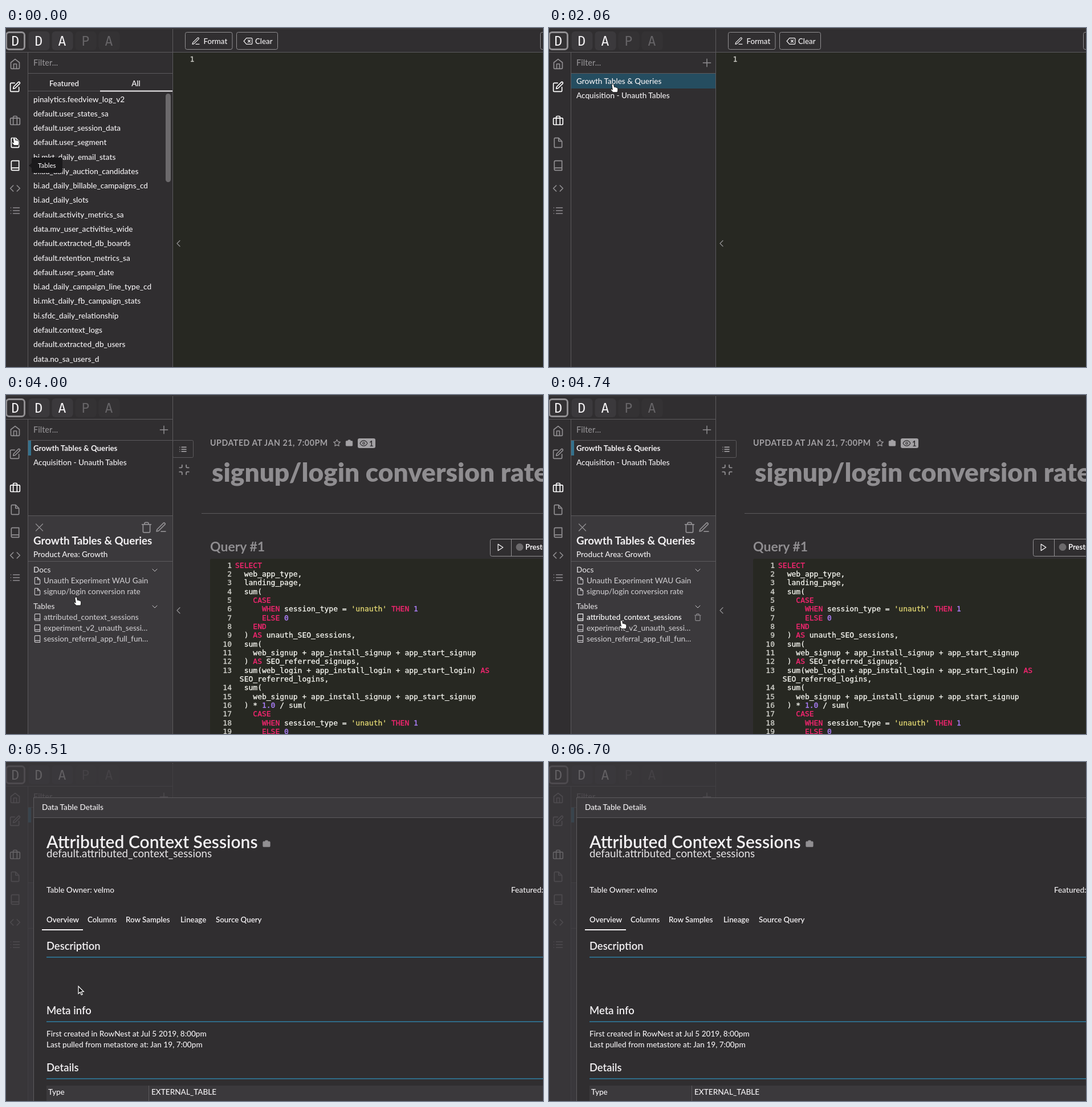
These frames come from a looping animation (942 px wide and 594 px high, 7.12 s). An HTML page:

```html
<!DOCTYPE html>
<html lang="en">
<head>
<meta charset="utf-8">
<title>Table lists</title>
<style>
html, body { margin: 0; width: 100%; height: 100%; overflow: hidden; background: #302e30; }
svg { display: block; width: 942px; height: 594px; }
text { font: 500 13.6px Lato, "Open Sans", sans-serif; white-space: pre; }
.mono { font-family: "DejaVu Sans Mono", "Liberation Mono", monospace; font-weight: 400; }
.code { font-size: 13px; stroke-width: .3px; }
</style>
</head>
<body>
<svg id="stage" viewBox="0 0 942 594"></svg>
<script>
const paths = {
  home: 'M3 9l9-7 9 7v11a2 2 0 0 1-2 2H5a2 2 0 0 1-2-2zM9 22V12h6v10',
  edit: 'M11 4H4a2 2 0 0 0-2 2v14a2 2 0 0 0 2 2h14a2 2 0 0 0 2-2v-7M18.5 2.5a2.1 2.1 0 0 1 3 3L12 15l-4 1 1-4z',
  lists: 'M4 7h16a2 2 0 0 1 2 2v10a2 2 0 0 1-2 2H4a2 2 0 0 1-2-2V9a2 2 0 0 1 2-2zM16 21V5a2 2 0 0 0-2-2h-4a2 2 0 0 0-2 2v16',
  file: 'M13 2H6a2 2 0 0 0-2 2v16a2 2 0 0 0 2 2h12a2 2 0 0 0 2-2V9zM13 2v7h7',
  book: 'M4 19.5A2.5 2.5 0 0 1 6.5 17H20M6.5 2H20v20H6.5A2.5 2.5 0 0 1 4 19.5v-15A2.5 2.5 0 0 1 6.5 2z',
  code: 'M16 18l6-6-6-6M8 6l-6 6 6 6',
  menu: 'M8 6h13M8 12h13M8 18h13M3 6h.01M3 12h.01M3 18h.01',
  trash: 'M3 6h18M19 6v14a2 2 0 0 1-2 2H7a2 2 0 0 1-2-2V6m3 0V4a2 2 0 0 1 2-2h4a2 2 0 0 1 2 2v2',
  pencil: 'M12 20h9M16.5 3.5a2.1 2.1 0 0 1 3 3L7 19l-4 1 1-4z',
  erase: 'M21 4H8l-7 8 7 8h13a2 2 0 0 0 2-2V6a2 2 0 0 0-2-2zM18 9l-6 6M12 9l6 6',
  shrink: 'M8 3v3a2 2 0 0 1-2 2H3m18 0h-3a2 2 0 0 1-2-2V3m0 18v-3a2 2 0 0 1 2-2h3M3 16h3a2 2 0 0 1 2 2v3',
  play: 'M5 3l14 9-14 9z',
  eye: 'M1 12s4-8 11-8 11 8 11 8-4 8-11 8-11-8-11-8zM15 12a3 3 0 1 1-6 0 3 3 0 0 1 6 0z',
  star: 'M12 2l3.1 6.3 6.9 1-5 4.9 1.2 6.8-6.2-3.2L5.8 21 7 14.2 2 9.3l6.9-1z',
  close: 'M3 3l18 18M21 3L3 21',
  plus: 'M12 2v20M2 12h20',
  down: 'M4 8l8 8 8-8',
  left: 'M16 4l-8 8 8 8',
  bag: 'M4 6h4V5a2 2 0 0 1 2-2h4a2 2 0 0 1 2 2v1h4a2 2 0 0 1 2 2v11a2 2 0 0 1-2 2H4a2 2 0 0 1-2-2V8a2 2 0 0 1 2-2z'
};
const BG = '#302e30', PANEL = '#3b393c', LINE = '#5c5a5d', GREY = '#918f92', TEXT = '#f3f1f3', SOFT = '#c9c7ca', BLUE = '#2f6b87';

const rect = (x, y, w, h, fill, more = '') => `<rect x="${x}" y="${y}" width="${w}" height="${h}" fill="${fill}" ${more}/>`;
const box = (x, y, w, h, r = 3, stroke = GREY) => rect(x, y, w, h, 'none', `rx="${r}" stroke="${stroke}"`);
const text = (x, y, str, fill = TEXT, style = '', more = '') =>
  `<text x="${x}" y="${y}" fill="${fill}" style="${style}" ${more}>${str.replace(/&/g, '&amp;')}</text>`;
const codeText = (x, y, str, fill, anchor = 'start') =>
  text(x, y, str, fill, '', `class="mono code" stroke="${fill}" text-anchor="${anchor}"`);
const bold = (size, weight = 700) => `font-size:${size}px;font-weight:${weight}`;
const icon = (name, x, y, size, color = GREY, id = '', width = 2, fill = 'none') =>
  `<path ${id && `id="${id}"`} d="${paths[name]}" transform="translate(${x} ${y}) scale(${size / 24}) translate(-12 -12)" fill="${fill}" stroke="${color}" stroke-width="${width}" stroke-linecap="round" stroke-linejoin="round"/>`;
const group = (id, body) => `<g id="${id}">${body}</g>`;
const $ = id => document.getElementById(id);

const letters = [['D', TEXT, '#343234'], ['D', TEXT, PANEL], ['A', TEXT, PANEL], ['P', '#666467', '#343234'], ['A', '#666467', '#343234']];
const navigation = [['home', 63], ['edit', 103], ['lists', 162], ['file', 201], ['book', 241], ['code', 281], ['menu', 320]];

const frame =
  rect(0, 0, 942, 594, BG) + rect(0, 1, 942, 1, '#403e40') +
  letters.map(([c, color, fill], i) => {
    const x = 16.5 + 41 * i;
    return (i ? rect(x - 18, 6, 37, 33, fill, 'rx="6"') : rect(.5, 7.5, 32, 30, fill, `rx="5" stroke="${GREY}" stroke-width="3"`)) +
      text(x, 31, c, color, 'font-size:23px', 'class="mono" text-anchor="middle"');
  }).join('') +
  rect(0, 42, 292, 1, LINE) + rect(38, 43, 1, 551, LINE) + rect(39, 79, 253, 1, LINE) +
  navigation.map(([name, y]) => icon(name, 16, y, 20, GREY, 'nav-' + name)).join('') +
  text(48, 66, 'Filter...', GREY, 'font-size:14.5px');

const tableNames = `pinalytics.feedview_log_v2 default.user_states_sa default.user_session_data default.user_segment
bi.mkt_daily_email_stats bi.ad_daily_auction_candidates bi.ad_daily_billable_campaigns_cd bi.ad_daily_slots
default.activity_metrics_sa data.mv_user_activities_wide default.extracted_db_boards default.retention_metrics_sa
default.user_spam_date bi.ad_daily_campaign_line_type_cd bi.mkt_daily_fb_campaign_stats bi.sfdc_daily_relationship
default.context_logs default.extracted_db_users data.no_sa_users_d`.split(/\s+/);

const tablePane =
  text(102, 101.5, 'Featured', TEXT, bold(13.3, 600), 'text-anchor="middle"') +
  text(228, 101.5, 'All', TEXT, bold(13.3, 600), 'text-anchor="middle"') +
  rect(39, 110, 253, 1, LINE) + rect(165, 109.5, 127, 2, TEXT) +
  tableNames.map((name, i) => text(48, 129.5 + 25.28 * i, name)).join('') +
  rect(280, 115, 9, 155, '#6c6a6c', 'rx="4.5"');

const tooltip = '<path d="M40 241l6-5v10z" fill="#1b1a1c"/>' + rect(45, 227, 54, 27, '#1b1a1c', 'rx="3"') +
  text(56, 245, 'Tables', TEXT, 'font-size:11.5px');

const listPane =
  icon('plus', 277, 61, 16, GREY, '', 2.2) +
  rect(39, 80, 253, 26, '#254d60', 'id="row-hover"') +
  rect(39, 80, 5, 26, '#34718d', 'id="row-mark"') +
  text(48, 98, 'Growth Tables & Queries', TEXT, '', 'id="row-name"') +
  text(48, 123, 'Acquisition - Unauth Tables');

const items = [['file', 325, 'Unauth Experiment WAU Gain'], ['file', 344, 'signup/login conversion rate'],
  ['book', 389, 'attributed_context_sessions'], ['book', 408, 'experiment_v2_unauth_sessi…'], ['book', 427, 'session_referral_app_full_fun…']];

const detailPane =
  rect(39, 211, 253, 383, PANEL) + rect(39, 211, 253, 1, LINE) + rect(39, 291, 253, 1, LINE) +
  icon('close', 58.5, 232, 16) +
  group('panel-tools', icon('trash', 246.5, 232, 21) + icon('pencil', 272, 232, 21)) +
  text(48, 262, 'Growth Tables & Queries', TEXT, bold(18.8)) +
  text(48, 284, 'Product Area: Growth') +
  text(48, 311, 'Docs', '#dddbdd') + icon('down', 261, 307, 12, SOFT) +
  text(48, 375, 'Tables', '#dddbdd') + icon('down', 261, 371, 12, SOFT) +
  items.map(([kind, y, name], i) => group('item' + i,
    icon(kind, 55, y + .5, 14, 'currentColor') + text(66, y + 4.7, name, 'currentColor'))).join('') +
  group('item-trash', icon('trash', 261, 0, 14));

const button = (x, w, name, iconX, textX, label) =>
  box(x, 7.5, w, 30) + icon(name, iconX, 23, 16, TEXT, '', 1.8) + text(textX, 27.5, label, TEXT, 'font-size:13.3px');
const editorPage =
  rect(293, 43, 649, 551, '#272822') + rect(293, 42, 649, 1, LINE) +
  button(314.5, 82.5, 'pencil', 333, 346.5, 'Format') + button(404.5, 72, 'erase', 424.5, 437, 'Clear') +
  box(937.5, 7.5, 40, 30) + codeText(322.5, 59, '1', '#d0d0ca');

const sql = `SELECT
  web_app_type,
  landing_page,
  sum(
    CASE
      WHEN session_type = 'unauth' THEN 1
      ELSE 0
    END
  ) AS unauth_SEO_sessions,
  sum(
    web_signup + app_install_signup + app_start_signup
  ) AS SEO_referred_signups,
  sum(web_login + app_install_login + app_start_login) AS
~SEO_referred_logins,
  sum(
    web_signup + app_install_signup + app_start_signup
  ) * 1.0 / sum(
    CASE
      WHEN session_type = 'unauth' THEN 1
      ELSE 0`;
const span = (str, color) => `<tspan fill="${color}" stroke="${color}">${str}</tspan>`;
const paint = line => line.replace(/'\w+'|\b(?:SELECT|CASE|WHEN|THEN|ELSE|END|AS)\b|\b\d[\d.]*\b/g,
  word => span(word, word[0] === "'" ? '#e6db74' : /\d/.test(word) ? '#ae81ff' : '#f92672'));
let lineNumber = 0;
const codeLines = sql.split('\n').map((line, i) => {
  const y = 302.5 + 15.35 * i, wrapped = line[0] === '~';
  return (wrapped ? '' : codeText(396, y, `${++lineNumber}`, '#d0d0ca', 'end')) +
    codeText(402, y, paint(line.replace('~', ' ')), '#f8f8f2');
}).join('');

const docPage =
  box(292.5, 79.5, 36, 30, 2, LINE) + icon('menu', 310.5, 95, 15, SOFT) + icon('shrink', 312.5, 131, 22) +
  text(358, 89, 'UPDATED AT JAN 21, 7:00PM', '#a3a1a4', bold(14.2) + ';letter-spacing:.55px') +
  icon('star', 580.5, 84, 14, '#a3a1a4') + icon('bag', 602, 84, 14, '#a3a1a4', '', 1, '#a3a1a4') +
  rect(617, 76, 31, 17, '#a3a1a4', 'rx="3"') + icon('eye', 627.5, 84.5, 14, BG) + text(637, 89.5, '1', BG, bold(13)) +
  text(361, 151.5, 'signup/login conversion rate', '#8f8d90', bold(46, 900)) +
  rect(343, 207, 599, 1, LINE) +
  text(358, 274, 'Query #1', '#8f8d90', bold(23)) +
  box(849.5, 252.5, 120, 30) + rect(886, 253, 1, 29, GREY) +
  icon('play', 867.5, 267, 15, TEXT) + '<circle cx="901" cy="266.5" r="6.5" fill="#6c6a6c"/>' +
  text(911, 271, 'Presto', TEXT, bold(13)) +
  rect(358, 287, 600, 320, '#272822', 'rx="3"') + codeLines;

const section = (y, title) => text(71, y, title, TEXT, bold(18.4, 600)) + rect(71, y + 12, 871, 2, BLUE);
const tabs = [[71, 'Overview'], [143, 'Columns'], [210, 'Row Samples'], [306, 'Lineage'], [368, 'Source Query']];
const modal =
  rect(48.5, 62.5, 920, 560, BG, `stroke="${LINE}"`) + rect(49, 63, 893, 34, PANEL) + rect(49, 97, 893, 1, LINE) +
  text(63, 84, 'Data Table Details') +
  group('modal-body',
    text(71, 150.5, 'Attributed Context Sessions', TEXT, bold(30, 600)) +
    icon('bag', 457, 143, 15, GREY, '', 1, GREY) +
    text(71, 167, 'default.attributed_context_sessions', '#e8e6e8', bold(18.7, 400)) +
    text(71, 228.5, 'Table Owner: velmo') + text(886, 228.5, 'Featured:') +
    tabs.map(([x, name]) => text(x, 281, name, TEXT, bold(13.3, 600))).join('') + rect(63, 293, 72, 2, TEXT) +
    section(329, 'Description') + section(442, 'Meta info') + section(542, 'Details') +
    text(71, 480.5, 'First created in RowNest at Jul 5 2019, 8:00pm') +
    text(71, 499.5, 'Last pulled from metastore at: Jan 19, 7:00pm') +
    rect(71, 567, 871, 27, PANEL) + rect(250, 567, 1, 27, LINE) +
    text(74, 582.5, 'Type') + text(255, 582.5, 'EXTERNAL_TABLE'));

const hand = '<path id="hand" fill="#fff" stroke="#111" d="M0 0c1 0 1.6.7 1.8 1.6l.8 4 .9-.3c1 0 1.3.4 1.6.8.8-.4 1.6 0 1.9.7 1-.2 1.7.4 1.8 1.5l.2 2.5c0 1.6-.8 2.4-1 4H0c-.4-1.6-2.4-2.6-3.4-4.4-.6-1 .6-2 1.6-1.2l1.2 1-1.2-7C-2 .8-1 0 0 0z"/>';
const arrow = '<path id="arrow" fill="#111" stroke="#fff" stroke-width="1.2" d="M0 0v13l3-2.7 2.2 4.7 2-.9-2.1-4.6h4.2z"/>';

$('stage').innerHTML = frame + group('tables', tablePane) + group('tooltip', tooltip) + group('lists', listPane) +
  group('detail', detailPane) + group('editor', editorPage) + group('doc', docPage) +
  rect(292, 2, 1, 592, LINE) + icon('left', 302.5, 377.5, 15, GREY, 'collapse') +
  rect(0, 3, 942, 591, PANEL, 'id="veil"') + group('modal', modal) + hand + arrow;

const LOOP = 7120;
// The picture is only refreshed in these bursts: first time, last time, steps.
const bursts = [[140, 1020, 7], [1320, 2200, 7], [2500, 3250, 6], [3550, 4590, 8], [4740, 4740, 1], [5180, 5660, 4], [6260, 6700, 4]];
const ticks = [0, ...bursts.flatMap(([from, to, n]) =>
  Array.from({ length: n }, (_, i) => n > 1 ? Math.floor((from + (to - from) * i / (n - 1)) / 10) * 10 : from))];
// Pointer keys: time, x, y.
const route = [[0, 14, 191], [140, 14, 189], [730, 16, 160], [1020, 18, 157], [1320, 20, 156], [2060, 112, 98], [2450, 112, 98],
  [3250, 121, 337], [3650, 121, 338], [4590, 127, 392], [4740, 127, 395], [5180, 127, 393], [6250, 127, 393],
  [6260, 674, 551], [6550, 682, 594], [LOOP, 682, 620]];

function pointerAt(t) {
  const i = route.findIndex(key => key[0] > t);
  const [t0, x0, y0] = route[i - 1], [t1, x1, y1] = route[i];
  const p = (t - t0) / (t1 - t0), e = p * p * (3 - 2 * p);
  return [x0 + (x1 - x0) * e, y0 + (y1 - y0) * e];
}
const show = (id, on) => $(id).style.display = on ? '' : 'none';

function draw(t) {
  const [x, y] = pointerAt(t);
  const inLists = t >= 720, opened = t >= 2200, dimmed = t >= 5180, left = t >= 3690;
  show('tables', !inLists);
  show('tooltip', t < 140);
  show('lists', inLists);
  show('detail', opened);
  show('editor', !left);
  show('doc', t >= 3840);
  show('collapse', !dimmed);

  const lit = { edit: !left, lists: inLists || y < 174, file: y > 183 && t < 720, book: !inLists };
  for (const [name] of navigation) $('nav-' + name).setAttribute('stroke', lit[name] ? '#fff' : GREY);

  show('row-hover', !opened && x > 39 && y < 131);
  $('row-hover').setAttribute('y', y < 106 ? 80 : 106);
  show('row-mark', opened);
  $('row-name').style.cssText = opened ? bold(13.3) : '';

  show('panel-tools', y > 212 && !dimmed);
  const over = dimmed || !opened ? -1 : items.findIndex(item => Math.abs(item[1] - y) < 9.5);
  items.forEach((_, i) => $('item' + i).style.color = i === over ? '#fff' : SOFT);
  show('item-trash', over >= 0);
  if (over >= 0) $('item-trash').setAttribute('transform', `translate(0 ${items[over][1] + .5})`);

  $('veil').setAttribute('opacity', !dimmed ? 0 : t < 5330 ? .66 : .79);
  show('modal', t >= 5330);
  show('modal-body', t >= 5490);
  $('modal').setAttribute('opacity', t < 5490 ? .7 : 1);
  show('hand', !dimmed);
  show('arrow', dimmed && t < 6700);
  $(dimmed ? 'arrow' : 'hand').setAttribute('transform', `translate(${x} ${y})`);
}

const start = performance.now();
let last = -1;
function loop() {
  const t = (performance.now() - start) % LOOP;
  const tick = ticks.filter(time => time <= t).pop();
  if (tick !== last) draw(last = tick);
  requestAnimationFrame(loop);
}
draw(0);
loop();
</script>
</body>
</html>
```
